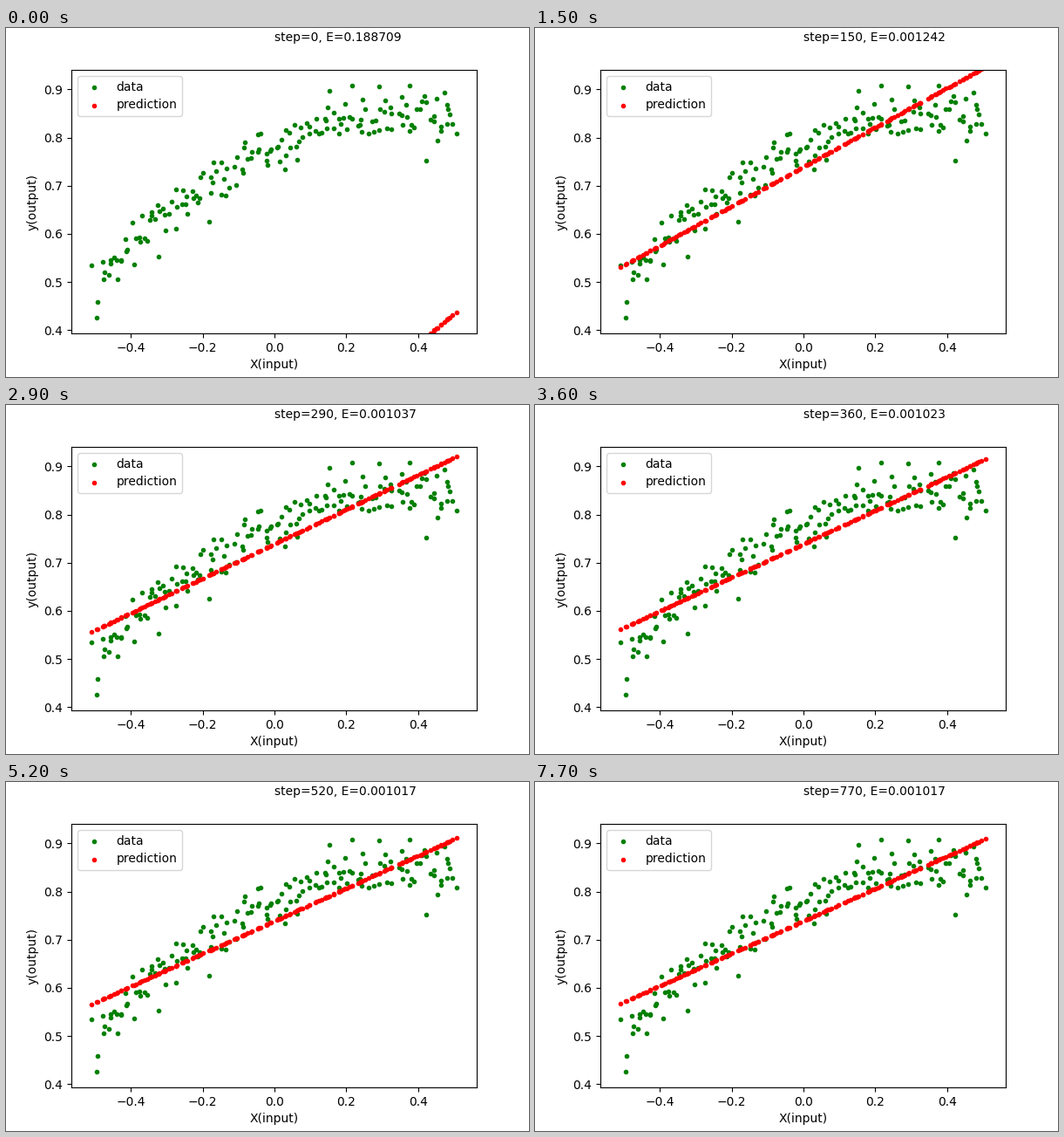
These frames come from a looping animation (600 px wide and 400 px high, 7.8 s). A matplotlib script:

```python
import numpy as np
import matplotlib.pyplot as plt
from matplotlib.animation import FuncAnimation

FRAMES, INTERVAL, STEPS = 78, 100, 10
COUNT = 156                          # points in the cloud

# Gradient descent of y = a + b * x, driven by the moments of x
RATE = 0.1
BEST = np.array([0.739, 0.336])      # converged intercept and slope
START = np.array([-0.606429, 0.26568])   # initial distance from it
MOMENTS = np.array([[1, -0.005], [-0.005, 0.08524]])
FLOOR = 0.001017                     # error that no line can remove

OUTLIERS = [
    (-0.511, 0.535), (-0.494, 0.459), (-0.496, 0.426), (-0.438, 0.506),
    (-0.324, 0.553), (-0.183, 0.626), (0.030, 0.734), (0.153, 0.897),
    (0.215, 0.908), (0.292, 0.906), (0.377, 0.908), (0.422, 0.752),
    (0.473, 0.893), (0.507, 0.808),
]


def make_data():
    rng = np.random.default_rng(4)
    x = np.linspace(-0.485, 0.497, COUNT) + rng.uniform(-0.01, 0.01, COUNT)
    noise = rng.normal(0, 0.024, COUNT).clip(-0.045, 0.045)
    y = 0.778 + 0.33 * x - 0.43 * x**2 + noise
    return np.vstack([OUTLIERS, np.column_stack([x, y])]).T


def descend():
    """Return (a, b, error) for every animated step."""
    off, history = START, []
    for step in range(FRAMES * STEPS):
        grad = MOMENTS @ off
        if step % STEPS == 0:
            history.append((*(BEST + off), FLOOR + off @ grad / 2))
        off = off - RATE * grad
    return history


x, y = make_data()
history = descend()

fig = plt.figure(figsize=(6, 4), dpi=100)
ax = fig.add_axes([0.125, 0.125, 0.775, 0.755])
ax.scatter(x, y, marker=".", color="green", label="data")
pred = ax.scatter(x, y, marker=".", color="red", label="prediction")
ax.set_xlim(-0.56633, 0.56341)
ax.set_ylim(0.39339, 0.94049)
ax.set_xticks(np.arange(-2, 3) / 5)
ax.set_yticks(np.arange(4, 10) / 10)
ax.set_xlabel("X(input)")
ax.set_ylabel("y(output)")
ax.legend(loc="upper left")
caption = ax.text(0, 1, "")


def update(i):
    a, b, error = history[i]
    pred.set_offsets(np.column_stack([x, a + b * x]))
    caption.set_text(f"step={i * STEPS}, E={error:.6f}")
    return pred, caption


anim = FuncAnimation(fig, update, frames=FRAMES, interval=INTERVAL,
                     repeat=True, repeat_delay=0)
plt.show()
```
